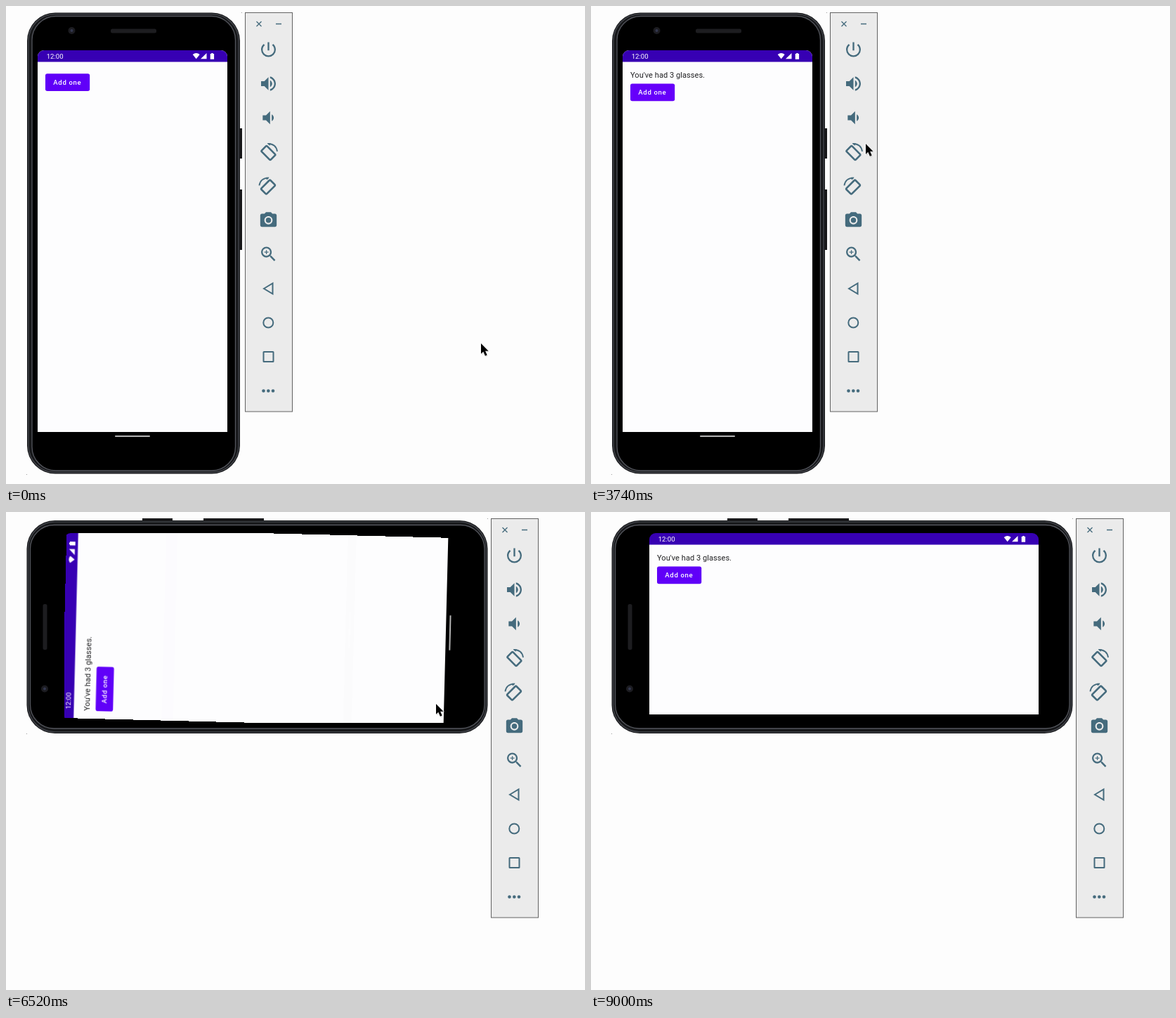
An HTML page for the animation above (9.06 s loop, 824 by 680 pixels).

```html
<!DOCTYPE html>
<html lang="en">
<head>
<meta charset="utf-8">
<title>Water counter</title>
<style>
html, body { margin: 0; width: 100%; height: 100%; overflow: hidden; background: #fdfdfd; }
svg { display: block; width: 824px; height: 680px; }
text { font-family: Roboto, Inter, sans-serif; }
.clock { font-size: 9.6px; fill: #fff; }
.body { font-size: 11px; letter-spacing: .06px; fill: #202022; }
.label { font-size: 9.6px; font-weight: 500; letter-spacing: .65px; fill: #fff; }
.icons { fill: #456b7d; }
.line { fill: none; stroke: #456b7d; stroke-width: 2; }

/* One loop for every part; 1% is 90.6 ms */
.anim { animation: 9060ms infinite step-end; }
.portrait { animation-name: portrait; }
.landscape { animation-name: landscape; }
.panel { animation-name: panel; }
.zero { animation-name: zero; }
.some { animation-name: some; }
.one { animation-name: one; }
.two { animation-name: two; }
.three { animation-name: three; }
.spin { animation-name: spin; transform-origin: 360px 165px; }
.fresh { animation-name: fresh; }
.gap { animation-name: gap; }
.handle { animation-name: handle; }
.cursor { animation-name: cursor; animation-timing-function: linear; }

@keyframes portrait { 0% { visibility: visible } 45.6%, 100% { visibility: hidden } }
@keyframes landscape { 0% { visibility: hidden } 45.6%, 100% { visibility: visible } }
@keyframes panel { 0% { transform: none } 45.6%, 100% { transform: translateX(350px) } }
@keyframes zero { 0% { opacity: 1 } 13%, 100% { opacity: 0 } }
@keyframes some { 0% { opacity: 0 } 13%, 100% { opacity: 1 } }
@keyframes one { 0% { opacity: 1 } 21.6%, 100% { opacity: 0 } }
@keyframes two { 0% { opacity: 0 } 21.6% { opacity: 1 } 30.9%, 100% { opacity: 0 } }
@keyframes three { 0% { opacity: 0 } 30.9%, 100% { opacity: 1 } }
@keyframes spin {
  0% { transform: rotate(-90deg) }
  71.96% { transform: rotate(-90deg); animation-timing-function: cubic-bezier(.22, 1, .36, 1) }
  76.38%, 100% { transform: rotate(0deg) }
}
@keyframes fresh {
  0% { opacity: 0 }
  71.96% { opacity: 0; animation-timing-function: linear }
  73.6%, 100% { opacity: 1 }
}
@keyframes gap { 0% { opacity: 0 } 74% { opacity: 1 } 76.38%, 100% { opacity: 0 } }
@keyframes handle {
  0% { opacity: .75 }
  75.1% { opacity: .75; animation-timing-function: linear }
  79%, 100% { opacity: 0 }
}
@keyframes cursor {
  0% { transform: translate(676px, 480px) }
  .8% { transform: translate(676px, 480px); animation-timing-function: ease-in-out }
  10% { transform: translate(105px, 113px) }
  14% { transform: translate(105px, 113px) }
  16%, 31.2% { transform: translate(105px, 122px); animation-timing-function: ease-in-out }
  38% { transform: translate(405px, 186px) }
  41.28% { transform: translate(391px, 196px) }
  43.5%, 47% { transform: translate(379px, 205px) }
  50.11% { transform: translate(385px, 201px); animation-timing-function: ease-in-out }
  60.26% { transform: translate(600px, 285px) }
  65%, 75.3% { transform: translate(612px, 273px); animation-timing-function: ease-in-out }
  82% { transform: translate(805px, 312px); opacity: 1 }
  82.2%, 100% { transform: translate(805px, 312px); opacity: 0 }
}
</style>
</head>
<body>
<svg viewBox="0 0 824 680">
<defs>
  <clipPath id="tall"><rect x="45" y="63" width="270" height="554" rx="9"/></clipPath>
  <clipPath id="wide"><rect x="83" y="30" width="554" height="270" rx="9"/></clipPath>

  <g id="phone">
    <path d="M332 174h4v43h-4zM332 261h4v86h-4z" fill="#18181a"/>
    <rect x="30" y="9.500" width="303" height="656" rx="40" fill="#161719"/>
    <rect x="32" y="11.500" width="299" height="652" rx="38" fill="none" stroke="#3f4147" stroke-width="1.500"/>
    <rect x="37" y="14.500" width="289.500" height="646.500" rx="34" fill="#000" stroke="#54565d" stroke-width="1.300"/>
    <rect x="149" y="32.500" width="65" height="6" rx="2.500" fill="#1d1d20"/>
    <circle cx="93.500" cy="35" r="5" fill="#1c1c21"/>
    <circle cx="93.500" cy="35" r="2" fill="#33374e"/>
  </g>

  <!-- Status icons, placed from the right edge of the screen -->
  <g id="status" fill="#fff">
    <path d="M-49.300 6Q-44.300 2.200-39.300 6L-44.300 12.300Z"/>
    <path d="M-29.500 4V12.300H-38Z"/>
    <path d="M-24.300 5h1.500v-1h2.400v1h1.500v7.700h-5.400z"/>
  </g>
  <text id="clock" class="clock" x="12.700" y="12">12:00</text>
  <g id="button">
    <rect x="11" y="33.200" width="63.200" height="24.700" rx="2.750"/>
    <text class="label" x="22.300" y="49">Add one</text>
  </g>
  <g id="app">
    <text class="body" x="11" y="39.200">You've had 3 glasses.</text>
    <use href="#button" y="14.300" fill="#6000f8"/>
  </g>
  <g id="tallShell">
    <rect width="270" height="554"/>
    <rect width="270" height="543" fill="#fdfdfe"/>
    <rect width="270" height="16.500" fill="#3700b3"/>
    <use href="#clock"/>
    <use href="#status" x="270"/>
    <rect x="110" y="548.200" width="50" height="1.600" rx=".8" fill="#eee"/>
  </g>

  <g id="turn">
    <rect x="-5.500" y="-9.200" width="11" height="18.400" rx="1.500" transform="translate(-.3 1.700) rotate(-45)" class="line" style="stroke-width:2.600"/>
    <path d="M-1-11.300Q10.500-11.500 12.300-.5" class="line" style="stroke-width:1.800"/>
    <path d="M-2-12.200h5L1.500-8.500Z"/>
  </g>
</defs>

<rect width="824" height="680" fill="#fdfdfd"/>

<g class="anim portrait">
  <path d="M335 9h1v1h-1zM29 666h1v1h-1z" fill="#999"/>
  <use href="#phone"/>
  <g clip-path="url(#tall)">
    <g transform="translate(45 63)">
      <use href="#tallShell"/>
      <g class="anim zero"><use href="#button" fill="#6000f8"/></g>
      <g class="anim some">
        <text class="body anim one" x="11" y="39.200">You've had 1 glasses.</text>
        <text class="body anim two" x="11" y="39.200">You've had 2 glasses.</text>
        <text class="body anim three" x="11" y="39.200">You've had 3 glasses.</text>
        <use href="#button" y="14.300" fill="#6600fa"/>
      </g>
    </g>
  </g>
</g>

<g class="anim landscape">
  <path d="M685 9h1v1h-1zM29 315h1v1h-1z" fill="#999"/>
  <use href="#phone" transform="matrix(0 -1 1 0 20 345)"/>
  <g clip-path="url(#wide)">
    <rect x="83" y="30" width="554" height="270"/>
    <rect class="anim gap" x="83" y="30" width="554" height="270" fill="#fdfdfe"/>
    <g class="anim spin">
      <g transform="translate(180 -175)">
        <g transform="translate(45 63)">
          <use href="#tallShell"/>
          <use href="#app"/>
        </g>
      </g>
      <g class="anim fresh">
        <g transform="translate(83 30)">
          <rect width="554" height="270"/>
          <rect width="554" height="258" fill="#fdfdfe"/>
          <rect width="554" height="16.500" fill="#3700b3"/>
          <use href="#clock"/>
          <use href="#status" x="554"/>
          <use href="#app"/>
          <rect class="anim handle" x="253" y="263.500" width="50" height="1.600" rx=".8" fill="#ddd"/>
        </g>
      </g>
    </g>
  </g>
</g>

<g class="anim panel">
  <rect x="340.500" y="9.500" width="67" height="567.500" fill="#ebebeb" stroke="#626262"/>
  <path class="line" style="stroke-width:1.300" d="M356.500 22l7 7m0-7l-7 7M384 25.500h8"/>
  <g class="icons">
    <g transform="translate(359.500 48) scale(1.167)">
      <path d="M13 3h-2v10h2V3zm4.830 2.170l-1.420 1.420A6.920 6.920 0 0 1 19 12c0 3.870-3.130 7-7 7s-7-3.130-7-7c0-2.200 1.020-4.160 2.600-5.420L6.170 5.170A8.932 8.932 0 0 0 3 12a9 9 0 0 0 18 0c0-2.740-1.230-5.180-3.170-6.830z"/>
    </g>
    <g transform="translate(359.500 96.500) scale(1.167)">
      <path d="M3 9v6h4l5 5V4L7 9H3zm13.500 3c0-1.770-1.020-3.290-2.500-4.030v8.050c1.480-.73 2.500-2.250 2.500-4.020zM14 3.230v2.060c2.890.86 5 3.540 5 6.710s-2.110 5.850-5 6.710v2.060c4.010-.91 7-4.490 7-8.770s-2.990-7.860-7-8.770z"/>
    </g>
    <g transform="translate(359.500 145) scale(1.167)">
      <path d="M18.500 12c0-1.770-1.020-3.290-2.500-4.030v8.050c1.480-.73 2.500-2.250 2.500-4.020zM5 9v6h4l5 5V4L9 9H5z"/>
    </g>
    <use href="#turn" transform="translate(373.700 207.300)"/>
    <use href="#turn" transform="translate(372.700 255.900) scale(-1 1)"/>
    <g transform="translate(359.500 290.800) scale(1.167)">
      <path fill-rule="evenodd" d="M9 2L7.170 4H4c-1.100 0-2 .9-2 2v12c0 1.100.9 2 2 2h16c1.100 0 2-.9 2-2V6c0-1.100-.9-2-2-2h-3.170L15 2H9zm3 15c-2.760 0-5-2.240-5-5s2.240-5 5-5 5 2.240 5 5-2.240 5-5 5z"/>
      <circle cx="12" cy="12" r="3.200"/>
    </g>
    <g transform="translate(359.500 339) scale(1.167)">
      <path d="M15.500 14h-.79l-.28-.27A6.471 6.471 0 0 0 16 9.500 6.500 6.500 0 1 0 9.500 16c1.610 0 3.090-.59 4.230-1.570l.27.28v.79l5 4.990L20.490 19l-4.990-5zm-6 0C7.010 14 5 11.990 5 9.500S7.010 5 9.500 5 14 7.010 14 9.500 11.990 14 9.500 14zm2.500-4h-2v2H9v-2H7V9h2V7h1v2h2v1z"/>
    </g>
    <circle cx="366.500" cy="547.500" r="2.300"/>
    <circle cx="373.300" cy="547.500" r="2.300"/>
    <circle cx="380" cy="547.500" r="2.300"/>
  </g>
  <g class="line">
    <path d="M367 402L379.500 394.500V409.500Z"/>
    <circle cx="373.300" cy="450.500" r="7"/>
    <rect x="366.500" y="492" width="14" height="14" rx=".5"/>
  </g>
</g>

<g class="anim cursor">
  <path d="M1 2V16L4.300 13L6.800 19L9.400 18L7 12H11.500Z" fill="#000" opacity=".18"/>
  <path d="M0 0V14.800L3.300 11.700L5.900 17.800L8.700 16.600L6.100 10.700H10.600Z" fill="#000" stroke="#fff" stroke-width="1.200" paint-order="stroke"/>
</g>
</svg>
</body>
</html>
```
